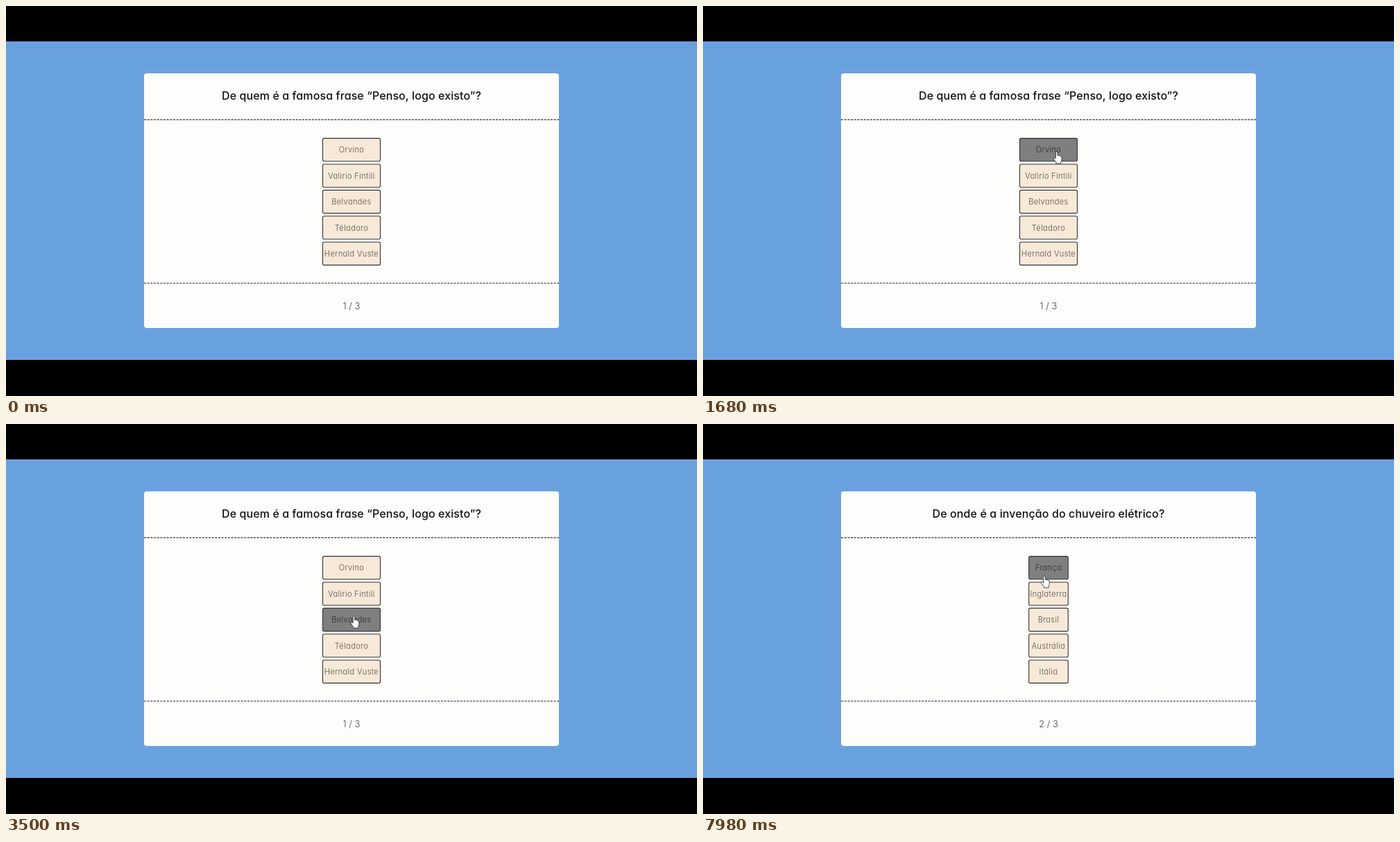
An HTML page for the animation above (8 s loop, 996 by 562 pixels).

```html
<!DOCTYPE html>
<html lang="pt-BR">
<head>
<meta charset="utf-8">
<title>Quiz</title>
<style>
  html, body { margin: 0; width: 100%; height: 100%; overflow: hidden; background: #000; }
  svg { display: block; width: 100%; height: 100%; }
  text { font-family: Inter, Roboto, sans-serif; font-feature-settings: "cv11"; text-anchor: middle; }
  .title { font-size: 16px; font-weight: 500; letter-spacing: .1px; fill: #111; }
  .label { font-size: 11px; font-weight: 300; letter-spacing: .4px; fill: #55504a; }
  .count { font-size: 13px; font-weight: 300; fill: #444; }
  .rule { stroke: #50505a; stroke-width: 1.4; stroke-dasharray: 3.1 1.55; }
  .option rect { fill: #f6e9d7; stroke: #333; stroke-width: 1.1; }
  .option.hover rect { fill: #7f7f7f; }
  .option.hover .label { fill: #2b2b2b; }
  .cursor { fill: #fff; stroke: #33363f; stroke-width: .9; stroke-linejoin: round; }
</style>
</head>
<body>
<svg id="stage" viewBox="0 0 996 562">
  <rect width="996" height="562"/>
  <rect y="51" width="996" height="459" fill="#69a1df"/>
  <rect x="199" y="97" width="598" height="367" rx="4" fill="#fdfdfc"/>
  <path class="rule" d="M199 163.8H797M199 399.4H797"/>
  <text class="title" id="title" x="498" y="135"/>
  <g id="options"></g>
  <text class="count" id="count" x="498" y="437.2"/>
  <g class="cursor" id="cursor">
    <path id="arrow" d="M0 0V12.4L2.8 9.8L4.8 14.2L6.9 13.3L5 9H8.7Z"/>
    <path id="hand" d="M-1.3 10V1.2A1.3 1.3 0 0 1 1.3 1.2V5.6Q1.5 4.6 2.5 4.8Q3.5 5 3.5 6Q4 5.1 4.9 5.5Q5.6 5.8 5.5 6.7Q7.3 6.1 7.3 8V11.6Q7.3 13.6 6 15V17H-.7V15.4Q-2.4 13.7-4.3 10Q-5 8.5-3.8 8.2Q-2.6 8-1.3 10Z"/>
  </g>
</svg>
<script>
const LOOP = 8000, TICK = 140;
const TOP = 190.6, PITCH = 37.4, HEIGHT = 33.2;
const NEXT_PAGE = 4340, HOVER_BACK = 4480, HAND_BACK = 6740;

const pages = [
  { title: "De quem é a famosa frase “Penso, logo existo”?", width: 83,
    labels: ["Orvino", "Valirio Fintili", "Belvandes", "Téladoro", "Hernald Vuste"] },
  { title: "De onde é a invenção do chuveiro elétrico?", width: 56.6,
    labels: ["França", "Inglaterra", "Brasil", "Austrália", "Itália"] }
];

// Pointer path: [tick, x, y]
const path = [
  [3, 985, 330], [4, 820, 268], [5, 690, 222], [6, 600, 198], [7, 548, 187], [8, 526, 187],
  [10, 515, 202], [13, 507, 214], [15, 504, 236], [17, 502, 262], [18, 501, 269],
  [21, 501, 273], [25, 501.5, 277], [52, 501.5, 277], [53, 501, 275], [54, 499, 267],
  [55, 497, 250], [56, 494, 233], [57, 492, 219]
];

const $ = id => document.getElementById(id);

function add(parent, name, attrs) {
  const node = document.createElementNS($("stage").namespaceURI, name);
  for (const key in attrs) node.setAttribute(key, attrs[key]);
  return parent.appendChild(node);
}

const options = pages[0].labels.map((_, i) => {
  const y = TOP + i * PITCH;
  const group = add($("options"), "g", { class: "option" });
  const box = add(group, "rect", { y, height: HEIGHT, rx: 2.2 });
  const label = add(group, "text", { class: "label", x: 498, y: y + 20.7 });
  return { group, box, label };
});

function pointAt(tick) {
  const next = path.findIndex(p => p[0] >= tick);
  if (next < 0) return path[path.length - 1].slice(1);
  if (next === 0) return path[0].slice(1);
  const [t0, x0, y0] = path[next - 1], [t1, x1, y1] = path[next];
  const k = (tick - t0) / (t1 - t0);
  return [x0 + (x1 - x0) * k, y0 + (y1 - y0) * k];
}

function hitOption(x, y, width) {
  const i = Math.floor((y - TOP) / PITCH);
  const inside = Math.abs(x - 498) <= width / 2 && y - TOP - i * PITCH <= HEIGHT + 1.2;
  return inside && options[i] ? i : -1;
}

let shown = -1;
function showPage(index) {
  if (index === shown) return;
  shown = index;
  const { title, width, labels } = pages[index];
  $("title").textContent = title;
  $("count").textContent = `${index + 1} / 3`;
  options.forEach(({ box, label }, i) => {
    box.setAttribute("x", 498 - width / 2);
    box.setAttribute("width", width);
    label.textContent = labels[i];
  });
}

function draw(t) {
  const page = t < NEXT_PAGE ? 0 : 1;
  showPage(page);

  const tick = Math.floor((t + 20) / TICK);
  const [x, y] = pointAt(tick);
  const visible = t >= 420;
  const fresh = t >= NEXT_PAGE && t < HOVER_BACK;
  const hit = visible && !fresh ? hitOption(x, y, pages[page].width) : -1;
  options.forEach(({ group }, i) => group.classList.toggle("hover", i === hit));

  const hand = hit >= 0 && !(t >= NEXT_PAGE && t < HAND_BACK);
  $("cursor").setAttribute("transform", `translate(${x} ${y})`);
  $("cursor").style.display = visible ? "" : "none";
  $("hand").style.display = hand ? "" : "none";
  $("arrow").style.display = hand ? "none" : "";
}

const start = performance.now();
function frame() {
  draw((performance.now() - start) % LOOP);
  requestAnimationFrame(frame);
}
frame();
</script>
</body>
</html>
```
